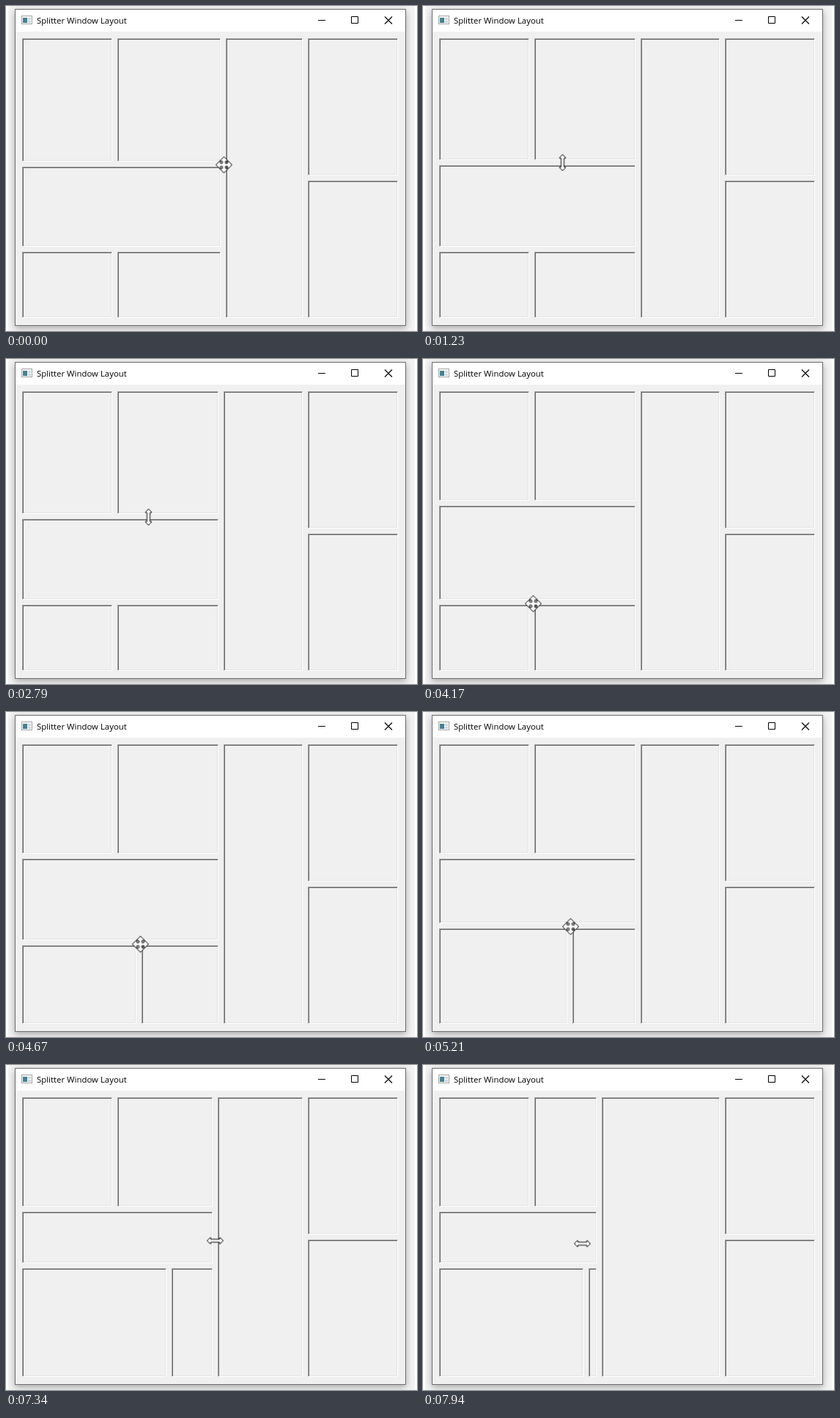
Animation of 561 by 443 pixels, one loop 8 s. Source, as an HTML page:

```html
<!DOCTYPE html>
<html lang="en">
<head>
<meta charset="utf-8">
<title>Splitter Window Layout</title>
<style>
/* cursor position */
@property --cx { syntax: "<integer>"; inherits: true; initial-value: 297; }
@property --cy { syntax: "<integer>"; inherits: true; initial-value: 216; }
/* column edge, row edges, bottom split */
@property --px { syntax: "<integer>"; inherits: true; initial-value: 293; }
@property --y1 { syntax: "<integer>"; inherits: true; initial-value: 212; }
@property --y2 { syntax: "<integer>"; inherits: true; initial-value: 328; }
@property --xb { syntax: "<integer>"; inherits: true; initial-value: 145; }

html, body { margin: 0; width: 100%; height: 100%; overflow: hidden; background: #fff; }
#stage {
  position: relative; width: 561px; height: 443px; overflow: hidden;
  animation: point 8s step-start -4ms infinite, column 8s step-start -4ms infinite,
    rows 8s step-start -4ms infinite, corner 8s step-start -4ms infinite;
}
#glow { position: absolute; left: 3px; top: -5px; width: 555px; height: 470px; border-radius: 10px; background: #f3f3f3; }
#win {
  position: absolute; left: 12px; top: 4px; width: 532px; height: 430px;
  border: 1px solid #6e6e6e; background: #f0f0f0; box-shadow: 0 3px 9px rgba(0, 0, 0, .32);
}
#bar { position: absolute; left: 13px; top: 5px; width: 532px; height: 30px; background: #fff; }
#bar span {
  position: absolute; left: 29px; top: 0; white-space: nowrap; color: #000;
  font: 11.4px/29px "Open Sans", "Noto Sans", sans-serif;
}
svg { position: absolute; left: 0; top: 0; overflow: visible; }

#panels { --x: max(var(--px), 237); }
#panels div {
  position: absolute; box-sizing: border-box;
  left: calc(var(--l) * 1px); top: calc(var(--t) * 1px);
  width: calc((var(--r) - var(--l)) * 1px); height: calc((var(--b) - var(--t)) * 1px);
  border: 1px solid; border-color: #a0a0a0 #fff #fff #a0a0a0;
  box-shadow: inset 1px 1px #696969, inset -1px -1px #e3e3e3;
}

#cursor { left: calc(var(--cx) * 1px); top: calc(var(--cy) * 1px); }
#cursor path { fill: #fff; stroke: #000; transform: translate(.5px, .5px); animation: 8s step-end -4ms infinite; }
#cursor #move { animation-name: move; }
#cursor #ns { animation-name: ns; }
#cursor #ew { animation-name: ew; }
#cursor #arrow { animation-name: arrow; }

@keyframes point {
  0% { --cx: 297; --cy: 216; }
  .75% { --cx: 297; --cy: 216; animation-timing-function: steps(3, start); }
  3% { --cx: 294; --cy: 214; }
  5.25% { --cx: 294; --cy: 214; animation-timing-function: steps(4, start); }
  8.25% { --cx: 268; --cy: 274; animation-timing-function: steps(5, start); }
  12% { --cx: 159; --cy: 262; animation-timing-function: steps(5, start); }
  15.375% { --cx: 190; --cy: 217; }
  19.875% { --cx: 190; --cy: 213; animation-timing-function: steps(7, start); }
  24.875% { --cx: 192; --cy: 103; animation-timing-function: steps(8, start); }
  30.625% { --cx: 191; --cy: 247; }
  32.625% { --cx: 191; --cy: 247; animation-timing-function: steps(4, start); }
  35.625% { --cx: 194; --cy: 215; animation-timing-function: steps(3, start); }
  37.875% { --cx: 194; --cy: 197; animation-timing-function: steps(7, start); }
  43.125% { --cx: 161; --cy: 289; animation-timing-function: steps(4, start); }
  46.125% { --cx: 149; --cy: 327; }
  47.625% { --cx: 149; --cy: 327; }
  48.34% { --cx: 147; --cy: 331; animation-timing-function: steps(3, start); }
  50.96% { --cx: 149; --cy: 333; }
  52.125% { --cx: 149; --cy: 333; }
  52.84% { --cx: 150; --cy: 333; animation-timing-function: steps(5, start); }
  56.4% { --cx: 200; --cy: 262; animation-timing-function: steps(6, start); }
  60.69% { --cx: 165; --cy: 370; animation-timing-function: steps(3, start); }
  62.875% { --cx: 177; --cy: 345; animation-timing-function: steps(4, start); }
  65.875% { --cx: 201; --cy: 292; animation-timing-function: steps(3, start); }
  68.125% { --cx: 223; --cy: 274; animation-timing-function: steps(5, start); }
  72.625% { --cx: 277; --cy: 242; }
  73.375% { --cx: 277; --cy: 242; animation-timing-function: steps(2, start); }
  75.125% { --cx: 285; --cy: 239; }
  76.375% { --cx: 285; --cy: 239; }
  80.375% { --cx: 287; --cy: 239; }
  84.25% { --cx: 289; --cy: 239; }
  85.19% { --cx: 291; --cy: 239; animation-timing-function: steps(2, start); }
  87.06% { --cx: 293; --cy: 239; }
  91.25% { --cx: 293; --cy: 239; animation-timing-function: steps(9, start); }
  97.72% { --cx: 218; --cy: 243; }
  99.25% { --cx: 218; --cy: 243; }
  100% { --cx: 217; --cy: 243; }
}
@keyframes column {
  0% { --px: 293; }
  .75% { --px: 293; animation-timing-function: steps(3, start); }
  3% { --px: 290; }
  91.25% { --px: 290; animation-timing-function: steps(9, start); }
  97.72%, 100% { --px: 215; }
}
@keyframes rows {
  0% { --y1: 212; }
  .75% { --y1: 212; animation-timing-function: steps(3, start); }
  3% { --y1: 210; }
  19.875% { --y1: 210; animation-timing-function: steps(7, start); }
  24.875% { --y1: 100; animation-timing-function: steps(8, start); }
  30.625% { --y1: 243; }
  32.625% { --y1: 243; animation-timing-function: steps(4, start); }
  35.625% { --y1: 211; animation-timing-function: steps(3, start); }
  37.875%, 100% { --y1: 193; }
}
@keyframes corner {
  0% { --xb: 145; --y2: 328; }
  52.84% { --xb: 145; --y2: 328; animation-timing-function: steps(5, start); }
  56.4% { --xb: 195; --y2: 257; animation-timing-function: steps(6, start); }
  60.69% { --xb: 160; --y2: 365; animation-timing-function: steps(3, start); }
  62.875% { --xb: 172; --y2: 341; animation-timing-function: steps(4, start); }
  65.875% { --xb: 197; --y2: 288; animation-timing-function: steps(3, start); }
  68.125%, 100% { --xb: 219; --y2: 270; }
}
@keyframes move { 0%, 47.625% { opacity: 1; } 5.25%, 68.125%, 100% { opacity: 0; } }
@keyframes ns { 15.375% { opacity: 1; } 0%, 37.875%, 100% { opacity: 0; } }
@keyframes ew { 84.25%, 100% { opacity: 1; } 0% { opacity: 0; } }
@keyframes arrow {
  5.25%, 37.875%, 68.125% { opacity: 1; }
  0%, 15.375%, 47.625%, 84.25%, 100% { opacity: 0; }
}
</style>
</head>
<body>
<div id="stage">
  <div id="glow"></div>
  <div id="win"></div>
  <div id="bar"><span>Splitter Window Layout</span></div>
  <svg width="561" height="40" fill="none">
    <rect x="21.5" y="13.5" width="14" height="11" fill="#f6f6f6" stroke="#a3a6a8"/>
    <rect x="23" y="16" width="6" height="7" fill="#47818f"/>
    <path d="M30 16h4v3h-4zM30 20h4v3h-4z" fill="#cdd8e2"/>
    <path d="M426 19.5h10M471.5 14.5h9v9h-9z" stroke="#000"/>
    <path d="M517 14.5l10 10M527 14.5l-10 10" stroke="#000" stroke-width="1.1"/>
  </svg>
  <div id="panels">
    <div style="--l:22; --t:44; --r:145; --b:var(--y1)"></div>
    <div style="--l:152; --t:44; --r:var(--x); --b:var(--y1)"></div>
    <div style="--l:22; --t:(var(--y1) + 7); --r:var(--x); --b:var(--y2)"></div>
    <div style="--l:22; --t:(var(--y2) + 7); --r:var(--xb); --b:425"></div>
    <div style="--l:(var(--xb) + 7); --t:(var(--y2) + 7); --r:var(--x); --b:425"></div>
    <div style="--l:(var(--x) + 7); --t:44; --r:405; --b:425"></div>
    <div style="--l:412; --t:44; --r:535; --b:231"></div>
    <div style="--l:412; --t:238; --r:535; --b:425"></div>
  </div>
  <svg id="cursor" width="1" height="1">
    <path id="move" d="M0-11L5-6V-5H2V-2H5V-5H6L11 0L6 5H5V2H2V5H5V6L0 11L-5 6V5H-2V2H-5V5H-6L-11 0L-6-5H-5V-2H-2V-5H-5V-6Z"/>
    <path id="ns" d="M0-11L4-7V-6H2V6H4V7L0 11L-4 7V6H-2V-6H-4V-7Z"/>
    <path id="ew" d="M-11 0L-7-4H-6V-2H6V-4H7L11 0L7 4H6V2H-6V4H-7Z"/>
    <path id="arrow" d="M0 0V16L4 12.3L6.6 18L9 17L6.5 11.4H11.4Z"/>
  </svg>
</div>
</body>
</html>
```
